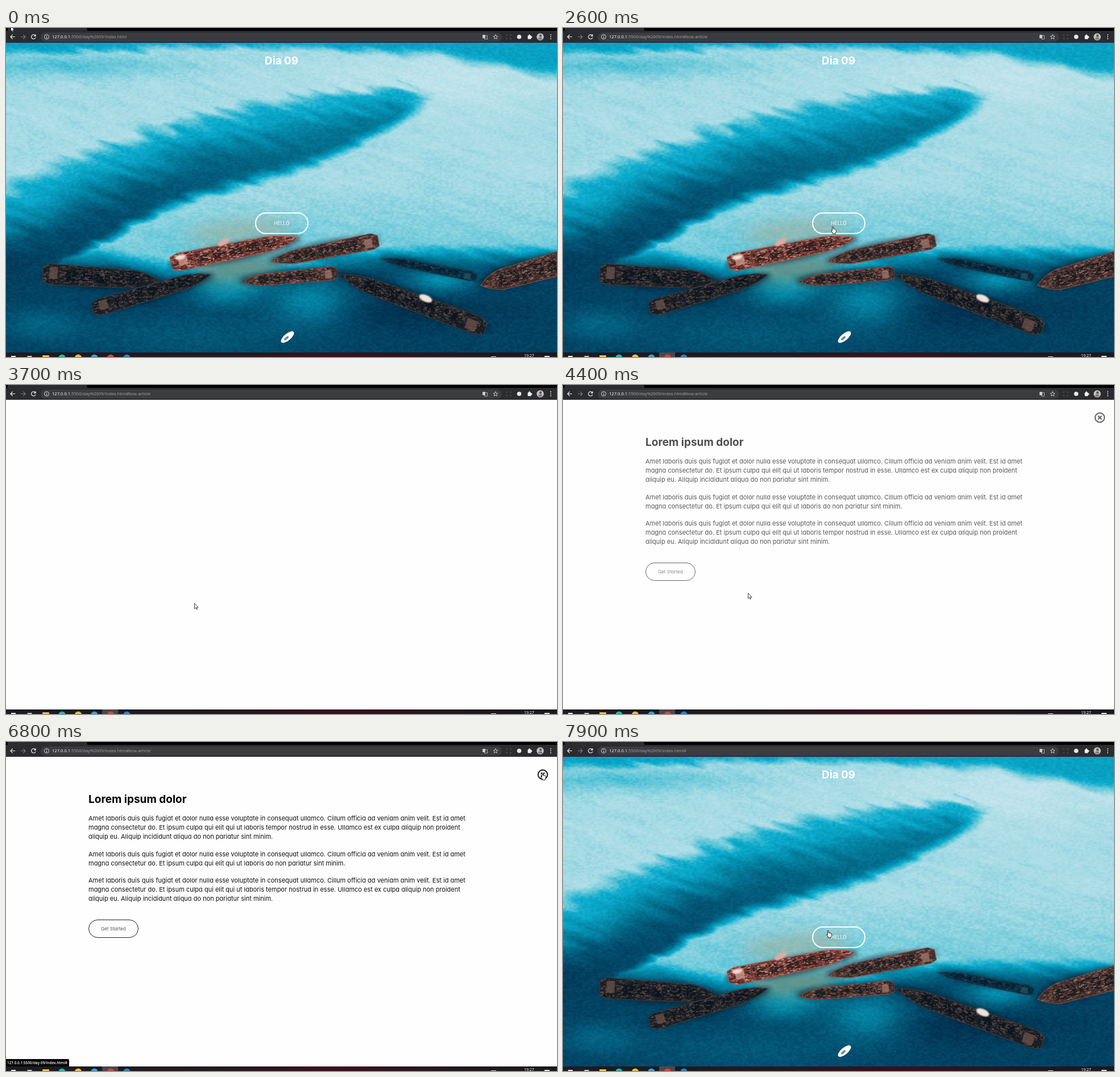
An HTML page with a canvas that plays this animation: 969x578 px, repeating every 8000 ms.

```html
<!DOCTYPE html>
<html lang="en">
<head>
<meta charset="utf-8">
<title>Day 09</title>
<style>
  html, body { margin: 0; width: 100%; height: 100%; overflow: hidden; background: #000; }
  body { position: relative; font-family: Inter, "Open Sans", sans-serif; font-feature-settings: "cv11"; }
  canvas, .abs, svg { position: absolute; left: 0; top: 0; white-space: pre; }
  .pill { box-sizing: border-box; border-radius: 40px; display: flex; align-items: center; justify-content: center; }
  #day { width: 969px; top: 44px; text-align: center; color: #fff; font: 700 18.8px/27px Inter, sans-serif; }
  #hello { left: 438px; top: 324px; width: 94px; height: 38px; border: 2px solid #fff; color: #fff; font-size: 8.4px; }
  #panel { background: #fefefe; }
  #article { width: 969px; height: 578px; color: #111; }
  #article h2 { position: absolute; margin: 0; left: 145px; top: 87px; font: 700 19px/27px Inter, sans-serif; color: #000; }
  #article p { position: absolute; margin: 0; left: 145px; font-size: 11px; line-height: 16.2px; }
  #start { left: 145px; top: 312px; width: 88px; height: 32px; border: 1.5px solid #222; color: #555; font-size: 8.1px; }
  #url { left: 81px; top: 9px; font: 7.6px/13px "Open Sans", sans-serif; color: #a2a5a9; }
  #url b { font-weight: 400; color: #fff; }
  #status { top: 557px; height: 13px; box-sizing: border-box; padding: 0 3px 0 2px; background: #000; color: #fff;
    border-radius: 0 2px 0 0; font: 600 6.4px/13px "Open Sans", sans-serif; }
  #clock { left: 911px; top: 571px; font: 7px/9px "Open Sans", sans-serif; color: #fff; }
  svg { overflow: visible; }
</style>
</head>
<body>
<canvas id="photo" width="969" height="578"></canvas>
<div class="abs" id="day">Dia 09</div>
<div class="abs pill" id="hello">HELLO</div>
<div class="abs" id="panel"></div>
<div class="abs" id="article">
  <h2>Lorem ipsum dolor</h2>
  <p style="top:126px">Amet laboris duis quis fugiat et dolor nulla esse voluptate in consequat ullamco. Cillum officia ad veniam anim velit. Est id amet
magna consectetur do. Et ipsum culpa qui elit qui ut laboris tempor nostrud in esse. Ullamco est ex culpa aliquip non proident
aliquip eu. Aliquip incididunt aliqua do non pariatur sint minim.</p>
  <p style="top:188.5px">Amet laboris duis quis fugiat et dolor nulla esse voluptate in consequat ullamco. Cillum officia ad veniam anim velit. Est id amet
magna consectetur do. Et ipsum culpa qui elit qui ut laboris do non pariatur sint minim.</p>
  <p style="top:234.5px">Amet laboris duis quis fugiat et dolor nulla esse voluptate in consequat ullamco. Cillum officia ad veniam anim velit. Est id amet
magna consectetur do. Et ipsum culpa qui elit qui ut laboris tempor nostrud in esse. Ullamco est ex culpa aliquip non proident
aliquip eu. Aliquip incididunt aliqua do non pariatur sint minim.</p>
  <div class="abs pill" id="start">Get Started</div>
  <svg width="969" height="578" fill="none" stroke="#242428" stroke-width="2.1">
    <circle cx="944" cy="57.3" r="8.2"/><path d="M940.8 54.1l6.4 6.4m0-6.4l-6.4 6.4"/>
  </svg>
</div>
<canvas id="chrome" width="969" height="578"></canvas>
<div class="abs" id="url"><b>127.0.0.1</b><span id="path"></span></div>
<div class="abs" id="status"></div>
<div class="abs" id="clock">19:27</div>
<svg id="arrow" width="10" height="14"><path d="M.5 .5V10L2.6 8.2 4 11.3 5.4 10.7 4.1 7.7H7Z" fill="#fff" stroke="#111" stroke-width=".8"/></svg>
<svg id="hand" width="12" height="16"><path d="M2.4 8V1.6Q3.3 .3 4.2 1.6V5.4Q5.2 4.6 5.9 5.7 6.9 5 7.5 6 9.2 5.8 9.2 7.3V10Q8.8 11.3 8.2 12.1V13.8H3.4V12.2L.6 8.8Q.5 7 2.4 8.5Z" fill="#fff" stroke="#111" stroke-width=".9"/></svg>
<script>
const $ = id => document.getElementById(id);
const W = 969, H = 578, TOP = 26, BOTTOM = 570, MID = 298;
const unit = (v, a, b) => Math.min(1, Math.max(0, (v - a) / (b - a)));
const smooth = (v, a, b) => { const p = unit(v, a, b); return p * p * (3 - 2 * p); };
const bump = (x, y, cx, cy, rx, ry) => Math.exp(-(((x - cx) / rx) ** 2) - ((y - cy) / ry) ** 2);

function hash(x, y) {
  let h = Math.imul(x, 374761393) ^ Math.imul(y, 668265263);
  h = Math.imul(h ^ h >>> 13, 1274126177);
  return ((h ^ h >>> 16) >>> 8) / 16777216;
}

// value noise around zero
function noise(x, y) {
  const i = Math.floor(x), j = Math.floor(y), u = x - i, v = y - j;
  const a = hash(i, j), b = hash(i + 1, j), c = hash(i, j + 1), d = hash(i + 1, j + 1);
  return a + (b - a) * u + (c - a + (a - b - c + d) * u) * v - .5;
}

// water depth at a point: 0 is bright sand, 1 the deepest blue
function depth(x, y) {
  const along = x + .35 * y, across = y - .35 * x;
  const feather = noise(along / 60, across / 10);
  const ripple = noise(x / 4, y / 2.5);

  const upper = 285 - .47 * x + .00031 * x * x;
  const lower = 140 + (745 - x) * .43 + 17 * Math.sin((x - 430) / 95);
  const s = (y + feather * 34 - upper) / Math.max(28, lower - upper);
  let channel = smooth(s, -.22, .12) * .42 + smooth(s, .05, .75) * (.5 - .0004 * x);
  channel *= 1 - smooth(y + feather * 12, lower - 25, lower + 20);
  channel *= 1 - smooth(x, 680, 790);

  const rim = 44 - 9 * Math.sin(x / 250) ** 2 + .2 * Math.max(0, x - 760);
  const far = .47 * (1 - smooth(y + feather * 14, rim - 14, rim + 20));
  const sand = .13 + .13 * unit(y, 260, 400) - .1 * bump(x, y, 810, 85, 230, 60)
    + .18 * bump(x, y, 90, 66, 220, 20) + feather * .07;

  const shore = 405 + 45 * bump(x, 0, 400, 0, 150, 1);
  const shoals = .3 * bump(x, y, 535, 480, 70, 42) + .28 * bump(x, y, 385, 465, 60, 25)
    + .34 * bump(x, y, 765, 440, 60, 24) + .14 * bump(x, y, 60, 520, 70, 28) + .1 * bump(x, y, 330, 540, 200, 40);
  const sea = smooth(y + feather * 10, shore - 55, shore + 30) * (.9 - shoals + .07 * bump(x, y, 700, 500, 150, 30));

  return Math.max(channel, far, sand, sea) + ripple * .09 + (hash(x, y) - .5) * .025;
}

function gradient(c, len, ...cols) {
  const g = c.createLinearGradient(0, 0, len, 0);
  cols.forEach((col, i) => g.addColorStop(i / (cols.length - 1), col));
  return g;
}

function paintWater(c) {
  c.fillStyle = gradient(c, 256, '#c6e5ed', '#a4dae4', '#62c6d8', '#0babcd', '#058aab', '#046a89', '#034a6b', '#022c4b');
  c.fillRect(0, 0, 256, 1);
  const ramp = c.getImageData(0, 0, 256, 1).data;
  const img = c.createImageData(W, BOTTOM - TOP);
  for (let y = TOP, o = 0; y < BOTTOM; y++) {
    for (let x = 0; x < W; x++, o += 4) {
      const k = Math.round(255 * unit(depth(x, y), 0, 1)) * 4;
      for (let n = 0; n < 4; n++) img.data[o + n] = ramp[k + n];
    }
  }
  c.putImageData(img, 0, TOP);
}

function oval(c, fill, blur, x, y, rx, ry, rot = 0) {
  c.filter = blur ? `blur(${blur}px)` : 'none';
  c.fillStyle = fill;
  c.beginPath();
  c.ellipse(x, y, rx, ry, rot, 0, 7);
  c.fill();
  c.filter = 'none';
}

let seed = 0;
const rnd = () => hash(++seed, 9);

// a wreck from stern to bow; tones are hull, rail, gap, plate
function ship(c, x1, y1, x2, y2, w, tones) {
  const len = Math.hypot(x2 - x1, y2 - y1), h = w / 2;
  const [hull, rail, gap, plate] = tones;
  c.save();
  c.translate(x1, y1);
  c.rotate(Math.atan2(y2 - y1, x2 - x1));
  oval(c, 'rgba(2,25,42,.6)', 5, len / 2, 2, len * .52, h);
  const side = new Path2D(`M0 ${-h * .7}L${len * .06} ${-h}L${len * .78} ${-h * .85}Q${len * .92} ${-h * .6} ${len} 0`
    + `Q${len * .9} ${h * .7} ${len * .76} ${h * .85}L${len * .06} ${h}L0 ${h * .6}Z`);
  c.fillStyle = hull;
  c.fill(side);
  c.clip(side);
  c.globalAlpha = .8;
  for (let x = len * .2; x < len * .85; x += len * .13) {
    c.fillStyle = gap;
    c.fillRect(x, -h * .5, len * .1, h);
  }
  for (let i = 0; i < len * w / 9; i++) {
    c.globalAlpha = .25 + rnd() * .65;
    c.fillStyle = tones[1 + rnd() * 3 | 0];
    c.fillRect(rnd() * len, (rnd() * 2 - 1) * h, 1 + rnd() * 5, 1 + rnd() * 1.5);
  }
  c.globalAlpha = .75;
  c.strokeStyle = rail;
  c.lineWidth = 2.2;
  c.stroke(side);
  c.fillStyle = plate;
  c.fillRect(len * .06, -h * .7, len * .07, h * 1.1);
  c.restore();
}

function paintPhoto(c) {
  paintWater(c);
  oval(c, 'rgba(150,168,150,.75)', 14, 410, 357, 95, 15, -.1);
  oval(c, 'rgba(92,134,122,.8)', 12, 410, 425, 80, 24, -.1);

  const rust = ['#6b352f', '#b9695b', '#2a1d1f', '#d59a8b'];
  const brown = ['#46302d', '#84574c', '#191a1f', '#9c766b'];
  const dark = ['#1b2026', '#4c4240', '#0a141f', '#6b5148'];
  const sunk = ['#0a2e42', '#1f4252', '#061d30', '#24505e'];
  ship(c, 828, 438, 658, 405, 18, sunk);
  ship(c, 64, 432, 270, 444, 38, dark);
  ship(c, 152, 494, 361, 433, 30, dark);
  ship(c, 290, 414, 514, 369, 32, rust);
  ship(c, 655, 373, 466, 410, 29, brown);
  ship(c, 583, 430, 413, 446, 25, brown);
  ship(c, 844, 528, 584, 433, 34, dark);
  ship(c, 1000, 406, 834, 452, 44, brown);

  // white superstructures and the small boat
  oval(c, '#ecd9d1', 1, 306, 403, 9, 4, -.2);
  oval(c, '#d9ada2', 1, 383, 376, 12, 5, -.5);
  oval(c, '#efe1d8', 1, 738, 475, 12, 6, .4);
  oval(c, '#fff', 0, 495, 543, 14, 6, -.7);
  oval(c, '#6c8898', 0, 493, 545, 5, 2, -.7);
}

function paintChrome(c, active) {
  const box = (col, x, y, w, h, r = 0) => {
    c.fillStyle = col;
    c.beginPath();
    c.roundRect(x, y, w, h, r);
    c.fill();
  };
  const dot = (col, x, y, r) => box(col, x - r, y - r, 2 * r, 2 * r, r);
  const line = (col, d, lw = 1.2) => {
    c.strokeStyle = col;
    c.lineWidth = lw;
    c.stroke(new Path2D(d));
  };
  box('#000', 0, 0, W, 6);
  box('#2b2c2f', 3, 0, 140, 6, [0, 3, 0, 0]);
  box('#2b2c2f', 0, 5, W, 21);
  box('#3b3c3f', 61, 8, 811, 16, 8);
  line('#f1f1f1', 'M16 15.5H8M11.7 11.7L8 15.5 11.7 19.3');
  line('#77797c', 'M26 15.5H34M30.3 11.7L34 15.5 30.3 19.3');
  line('#f1f1f1', 'M51.3 13A3.8 3.8 0 1 0 52 16.6M52 11.3V14.2H49');
  line('#d8d8d8', 'M75.5 15.5A4 4 0 1 1 67.5 15.5A4 4 0 1 1 75.5 15.5M71.5 15V18M71.5 13V14', 1);
  box('#c9cacc', 838, 12, 5, 6, 1);
  line('#c9cacc', 'M843.5 13.5H846.5V19.5H841.5V18', .8);
  line('#d0d1d3', 'M861 11.5L862.2 14.3 865 14.5 862.8 16.4 863.5 19.3 861 17.7 858.5 19.3 859.2 16.4 857 14.5 859.8 14.3Z', .9);
  line('#5c5e61', 'M880 13.5V12H882M886 12H888V13.5M888 17.5V19H886M882 19H880V17.5', 1);
  dot('#e4e5e7', 902.5, 15.5, 3.8);
  box('#f0f0f0', 917.5, 13, 6, 6.5, 1);
  dot('#f0f0f0', 920.5, 12.7, 1.4);
  dot('#f0f0f0', 924, 16, 1.4);
  dot('#bfc3c4', 939.5, 15.5, 6.3);
  dot('#675452', 940, 13.5, 2.2);
  box('#8d7370', 936, 16.5, 7, 4, 2);
  for (let y = 12; y < 20; y += 3.5) dot('#eee', 958, y, .9);

  // taskbar with its row of evenly spaced icons
  box(gradient(c, W, '#1c1c22', '#1e1a20', '#231920', '#3a0f1d', '#221820', '#19191f'), 0, BOTTOM, W, 8);
  if (active) box('#4b474e', 169, BOTTOM, 28, 8);
  ['#f2f2f2', '#c8c8cc', '#f4c343', '#27b5b1', '#efbd3b', '#35a4d4', '#d8433c', '#2386d1'].forEach((col, i) => {
    const x = 13 + 28.5 * i;
    if (i < 2) box(col, x - 4, 576, 8, 2);
    else if (i === 2) box(col, x - 6, 575, 12, 3, 1);
    else dot(col, x, 579.5, 6);
  });
  box('#e6e6e8', 853, 577, 9, 1);
  box('#e6e6e8', 947, 576, 9, 2);
}

// each pointer move: leaves at, arrives at, x, y
const home = [8, -4];
const moves = [
  [100, 1000, 376, 230], [1000, 1100, 392, 230], [1200, 1700, 540, 200], [1700, 2100, 496, 348],
  [2400, 2900, 425, 347], [3000, 3600, 376, 353], [3600, 3700, 331, 383], [4000, 4900, 317, 340],
  [4900, 5400, 438, 337], [5500, 5900, 877, 122], [6100, 6400, 940, 53], [6900, 7600, 522, 216], [7700, 7900, 463, 330]
];

function pointer(t) {
  let [x, y] = home;
  for (const [from, to, tx, ty] of moves) {
    const p = smooth(t, from, to);
    x += (tx - x) * p;
    y += (ty - y) * p;
  }
  return [x, y];
}

const OPEN = 3700, CLOSE = 7000, CLICK = 2500;
const chrome = $('chrome').getContext('2d');
let lit = null;

function draw(t) {
  const open = t >= OPEN && t < CLOSE;

  // a thin line sweeps across, then snaps to the full page
  const sweep = t < CLOSE ? unit(t, 3040, 3678) : 1 - unit(t, CLOSE, 7600);
  const half = open ? (BOTTOM - TOP) / 2 : .75;
  Object.assign($('panel').style, { width: W * sweep + 'px', top: MID - half + 'px', height: 2 * half + 'px' });
  $('article').style.opacity = open ? 1 - (1 - unit(t, 4000, 4900)) ** 2 : 0;

  const anchor = t < CLICK ? '' : t < CLOSE ? '#box-article' : '#';
  $('path').textContent = ':5500/day%2009/index.html' + anchor;
  const opening = t >= 2300 && t < CLICK, closing = t >= 6700 && t < CLOSE;
  $('status').style.display = opening || closing ? 'block' : 'none';
  $('status').textContent = '127.0.0.1:5500/day 09/index.html#' + (opening ? 'box-article' : '');

  const [x, y] = pointer(t);
  const over = open ? Math.hypot(x + 3 - 944, y - 57) < 9 : x > 437 && x < 532 && y > 324 && y < 362;
  for (const [id, on] of [['hand', over], ['arrow', !over]]) {
    $(id).style.display = on ? 'block' : 'none';
    $(id).style.transform = `translate(${x}px,${y}px)`;
  }

  const active = t >= 200;
  if (active !== lit) {
    chrome.clearRect(0, 0, W, H);
    paintChrome(chrome, active);
    lit = active;
  }
}

paintPhoto($('photo').getContext('2d'));
const begin = performance.now();
function tick() {
  draw(Math.floor((performance.now() - begin) % 8000 / 100) * 100);
  requestAnimationFrame(tick);
}
tick();
</script>
</body>
</html>
```
